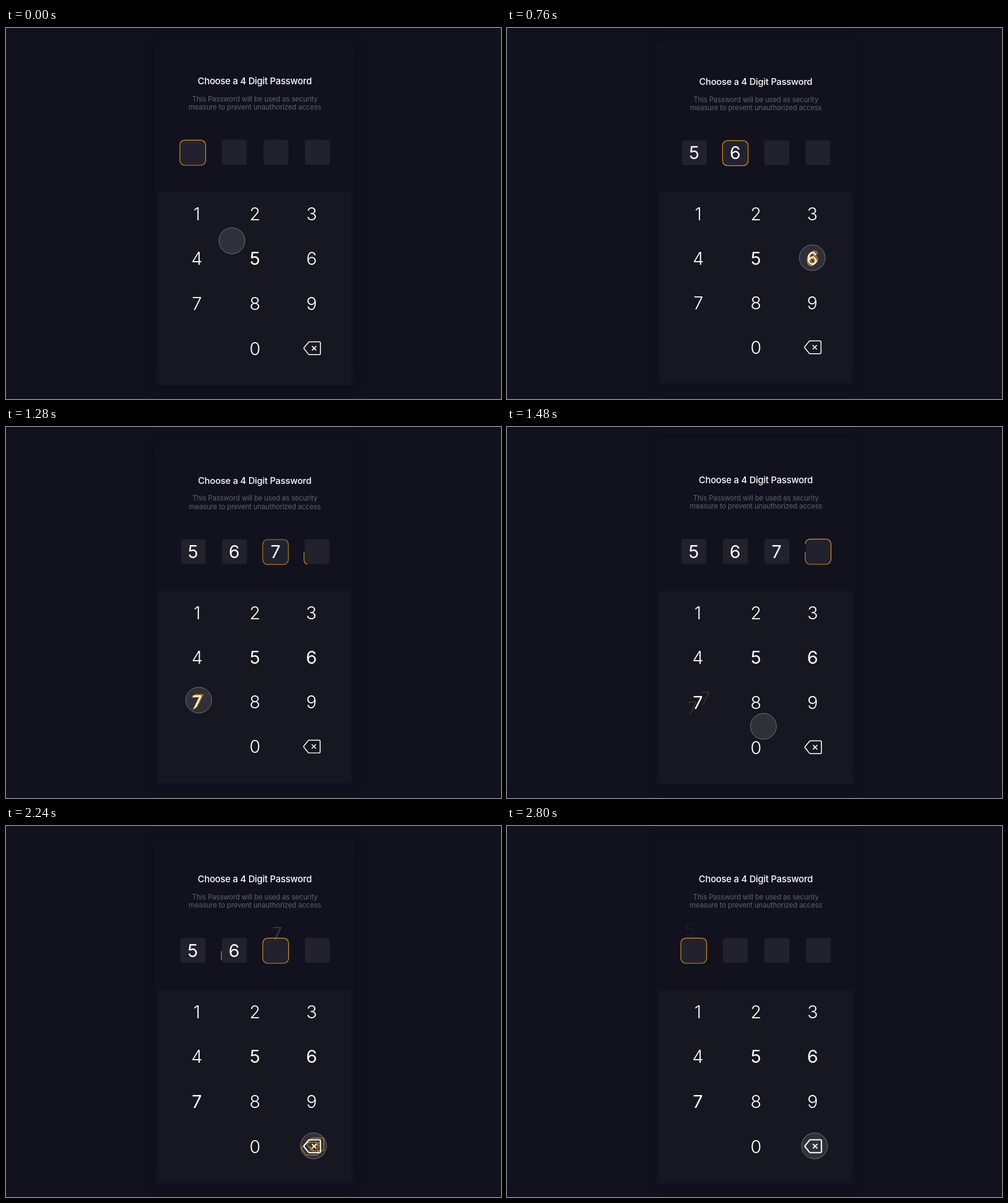
Write an HTML page that moves like this. It is 800 px wide and 600 px high and loops after 2.92 s.

```html
<!DOCTYPE html>
<html lang="en">
<head>
<meta charset="utf-8">
<title>Passcode keypad</title>
<style>
html, body { margin: 0; width: 100%; height: 100%; overflow: hidden; background: #12121e; }
svg { display: block; width: 100vw; height: 100vh; }
text { font-family: Inter, "Open Sans", sans-serif; text-anchor: middle; }
.title { font-size: 14.8px; font-weight: 500; fill: #fff; letter-spacing: -.22px; }
.note { font-size: 11.3px; fill: #62626b; letter-spacing: -.09px; }
.key { font-size: 28.8px; font-weight: 300; fill: #fff; }
.bold { font-weight: 400; }
.icon { fill: none; stroke: #fff; stroke-width: 1.5; stroke-linejoin: round; stroke-linecap: round; }
.icon.bold { stroke-width: 2; }
.ghost.key { fill: #e69b14; }
.ghost.icon { stroke: #e69b14; }
.ring { fill: none; stroke: #d8920f; stroke-width: 1.2; }
</style>
</head>
<body>
<svg viewBox="0 0 800 600">
  <defs><filter id="soft" x="-20%" y="-20%" width="140%" height="140%"><feGaussianBlur stdDeviation="10"/></filter></defs>
  <rect width="800" height="600" fill="#12121e"/>
  <g id="phone">
    <rect x="240" y="23" width="324" height="556" fill="#0a0a14" opacity=".45" filter="url(#soft)"/>
    <rect x="245.3" y="19" width="313.4" height="558" fill="#12111e"/>
    <rect x="245.3" y="265" width="313.4" height="312" fill="#171721"/>
    <text class="title" x="402" y="91">Choose a 4 Digit Password</text>
    <text class="note" x="402.3" y="118.5">This Password will be used as security</text>
    <text class="note" x="402.3" y="132">measure to prevent unauthorized access</text>
    <g id="slots"></g>
    <circle id="touch" r="21" fill="#fff" fill-opacity=".105" stroke="#fff" stroke-opacity=".34"/>
    <g id="keys"></g>
  </g>
</svg>
<script>
const LOOP = 2920, STEP = 40, LAST = 2800;
const $ = id => document.getElementById(id);
const clamp = v => Math.max(0, Math.min(1, v));
const ramp = (t, start, length) => clamp((t - start) / length);
const smooth = u => u * u * (3 - 2 * u);
const mix = (a, b, u) => a + (b - a) * u;

function add(parent, tag, attrs, text) {
  const el = document.createElementNS("http://www.w3.org/2000/svg", tag);
  for (const name in attrs) el.setAttribute(name, attrs[name]);
  if (text) el.textContent = text;
  return parent.appendChild(el);
}
function place(el, x, y, alpha) {
  el.setAttribute("transform", `translate(${x.toFixed(2)} ${y.toFixed(2)})`);
  el.setAttribute("opacity", alpha.toFixed(3));
}

// Moments when the finger is fully down
const taps = { 5: [200], 6: [700], 7: [1210], del: [1870, 2120, 2385] };
const allTaps = Object.values(taps).flat();

const slots = [
  { digit: "5", typed: 160, erased: 2495, drift: -7, rings: [[-400, 320], [2500, 9999]] },
  { digit: "6", typed: 660, erased: 2240, drift: -2, rings: [[310, 820], [2215, 2500]] },
  { digit: "7", typed: 1170, erased: 1980, drift: 3, rings: [[842, 1250], [1950, 2250]] },
  { rings: [[1243, 1960]] }
];
slots.forEach((slot, i) => {
  const x = 282 + 67 * i, g = $("slots");
  add(g, "rect", { x, y: 181, width: 40.3, height: 40.3, rx: 4, fill: "#21222e" });
  // Anticlockwise outline starting at the middle of the left side
  slot.ring = add(g, "path", {
    class: "ring", pathLength: 100,
    d: `M${x - 1} 202.5v11.5a8 8 0 0 0 8 8h25.6a8 8 0 0 0 8-8v-24.6a8 8 0 0 0-8-8h-25.6a8 8 0 0 0-8 8z`
  });
  if (slot.digit) {
    slot.x = x + 19.7;
    slot.text = add(g, "text", { class: "key bold" }, slot.digit);
  }
});

const columns = [308.5, 402.3, 494];
const labels = ["1", "2", "3", "4", "5", "6", "7", "8", "9", "", "0", "del"];
const keys = [];
function glyph(label, style) {
  if (label !== "del") return add($("keys"), "text", { class: "key " + style }, label);
  return add($("keys"), "path", {
    class: "icon " + style,
    d: "M-4.2-10.4H11.7q2 0 2 2V8.4q0 2-2 2H-4.2q-.8 0-1.4-.7L-12.6 1.1q-.9-1.1 0-2.2L-5.6-9.7q.6-.7 1.4-.7zM.5-3l6 6M6.5-3l-6 6"
  });
}
labels.forEach((label, i) => {
  if (!label) return;
  const x = columns[i % 3] + (label === "del" ? .5 : 0);
  const y = 300.3 + 72.6 * Math.floor(i / 3) + (label === "del" ? -.2 : 10.4);
  const key = { x, y, taps: taps[label] };
  if (key.taps) key.ghosts = [glyph(label, "ghost"), glyph(label, "ghost")];
  key.thin = glyph(label, "");
  if (key.taps) key.bold = glyph(label, "bold");
  place(key.thin, x, y, 1);
  keys.push(key);
});

// start, end, from x, from y, to x, to y
const moves = [
  [-150, 160, 331.5, 317.8, 402, 373],
  [310, 620, 402, 373, 494, 372],
  [873, 1183, 494, 372, 311, 442.5],
  [1308, 1628, 311, 442.5, 497, 517.3]
];

function drawSlot(slot, t) {
  let part = 0, alpha = 0;
  for (const [start, end] of slot.rings) {
    if (t < start) continue;
    part = ramp(t, start, 260);
    alpha = 1 - ramp(t, end, 160);
  }
  slot.ring.setAttribute("stroke-dasharray", part < 1 ? `${part * 100} 200` : "none");
  slot.ring.setAttribute("opacity", part ? alpha : 0);
  if (slot.text) {
    const fly = ramp(t, slot.erased, 325);
    place(slot.text, slot.x + slot.drift * fly, 211.7 - 35 * fly, ramp(t, slot.typed, 80) * (1 - fly) ** 1.2);
  }
}

function drawKey(key, t) {
  const warm = ramp(t, key.taps[0] - 260, 60);
  const tap = key.taps.filter(p => p <= t).pop();
  const age = tap === undefined ? 0 : t - tap;
  const k = age / 270, alpha = warm * clamp(1 - age / 335);
  place(key.ghosts[0], key.x + 12 * k, key.y - 7 * k, alpha);
  place(key.ghosts[1], key.x - 9 * k, key.y + 9 * k, alpha);
  place(key.thin, key.x, key.y, 1 - warm);
  place(key.bold, key.x, key.y, warm);
  const tint = tap === undefined ? "#fffaf0" : "#fff";
  key.bold.style[key.bold.tagName === "text" ? "fill" : "stroke"] = tint;
}

function draw(t) {
  let dip = 0;
  for (const p of allTaps) {
    const u = t < p ? ramp(t, p - 120, 120) : 1 - ramp(t, p, 115);
    dip = Math.max(dip, smooth(u));
  }
  $("phone").setAttribute("transform", `translate(402 298) scale(${1 - .015 * dip}) translate(-402 -298)`);
  const move = moves.filter(m => m[0] <= t).pop();
  const [start, end, x0, y0, x1, y1] = move;
  const u = smooth(ramp(t, start, end - start));
  place($("touch"), mix(x0, x1, u), mix(y0, y1, u), 1);
  slots.forEach(slot => drawSlot(slot, t));
  keys.forEach(key => key.taps && drawKey(key, t));
}

const begin = performance.now();
function tick() {
  const t = (performance.now() - begin) % LOOP;
  draw(Math.min(LAST, Math.floor(t / STEP) * STEP));
  requestAnimationFrame(tick);
}
draw(0);
requestAnimationFrame(tick);
</script>
</body>
</html>
```
